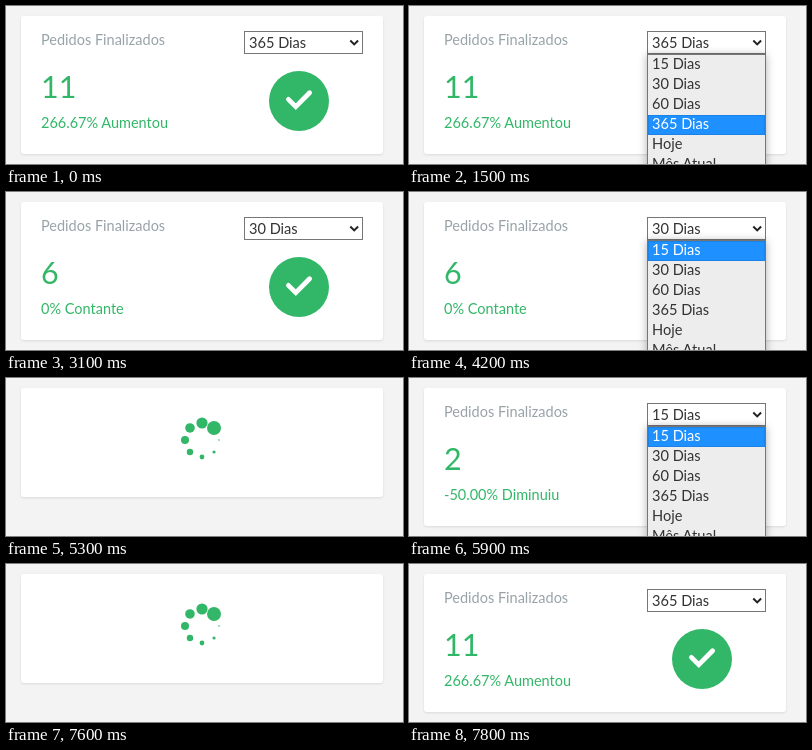
Write an HTML page that moves like this. It is 397 px wide and 158 px high and loops after 8 s.

```html
<!DOCTYPE html>
<html lang="pt">
<head>
<meta charset="utf-8">
<title>Pedidos Finalizados</title>
<style>
  html, body { margin: 0; width: 100%; height: 100%; overflow: hidden; background: #f3f3f3; }
  svg { display: block; width: 397px; height: 158px; font: 14.5px Lato, "Open Sans", sans-serif; }
  .title { fill: #98a3a8; }
  .green { fill: #32b768; }
  .count { font-size: 30.5px; }
  .field { font-size: 14.6px; fill: #333; }
  #card { filter: drop-shadow(0 1px 1px rgba(0, 0, 0, .1)); }
  #panel { filter: drop-shadow(0 1px 4px rgba(0, 0, 0, .32)); }
</style>
</head>
<body>
<svg viewBox="0 0 397 158">
  <rect width="397" height="158" fill="#f3f3f3"/>
  <rect id="card" x="15" y="10" width="362" height="138" rx="3" fill="#fff"/>
  <g id="content">
    <text class="title" x="35" y="39">Pedidos Finalizados</text>
    <text class="green count" id="count" x="35" y="91.5"></text>
    <text class="green" id="trend" x="35" y="122"></text>
    <circle class="green" cx="293" cy="95" r="30"/>
    <path d="M282.4 93.4L289.8 100.6L303.6 86.8" fill="none" stroke="#fff" stroke-width="4.8" stroke-linecap="round"/>
    <rect id="box" x="238.5" y="25.5" width="118" height="22" fill="#fff"/>
    <text class="field" id="value" x="243" y="42"></text>
    <path d="M344.3 34.5L348.2 38.4L352.1 34.5" fill="none" stroke="#222" stroke-width="2"/>
  </g>
  <g id="menu">
    <rect id="panel" x="238.5" y="48.5" width="118" height="130" fill="#ededed" stroke="#767676"/>
    <rect id="mark" x="239.5" width="116" height="19" fill="#1e90ff" stroke="#1c82e6"/>
  </g>
  <g id="loader"></g>
</svg>
<script>
const LOOP = 8000, DOTS = 8;
const options = ["15 Dias", "30 Dias", "60 Dias", "365 Dias", "Hoje", "Mês Atual"];
const results = {
  0: ["2", "-50.00% Diminuiu"],
  1: ["6", "0% Contante"],
  3: ["11", "266.67% Aumentou"]
};

// Each entry: start time, chosen option, view, highlighted option
const timeline = [
  [0, 3, "idle"],
  [1000, 3, "hover"],
  [1500, 3, "open", 3],
  [1700, 3, "open", 2],
  [1800, 3, "open", 0],
  [2000, 3, "open", 1],
  [2700, 3, "idle"],
  [2800, 1, "loading"],
  [3100, 1, "idle"],
  [3900, 1, "open", 1],
  [4200, 1, "open", 0],
  [5300, 0, "loading"],
  [5500, 0, "idle"],
  [5900, 0, "open", 0],
  [6200, 0, "open", 1],
  [6300, 0, "open", 2],
  [6400, 0, "open", 3],
  [7600, 3, "loading"],
  [7800, 3, "idle"]
];

const el = id => document.getElementById(id);
const add = (parent, tag, attrs) => {
  const node = document.createElementNS("http://www.w3.org/2000/svg", tag);
  for (const key in attrs) node.setAttribute(key, attrs[key]);
  return parent.appendChild(node);
};
const show = (node, on) => node.setAttribute("display", on ? "inline" : "none");

const labels = options.map((name, i) => {
  const label = add(el("menu"), "text", { class: "field", x: 243, y: 63 + 20 * i });
  label.textContent = name;
  return label;
});

const dots = Array.from({ length: DOTS }, (_, i) => {
  const angle = (i - 2) * Math.PI / 4;
  return add(el("loader"), "circle", {
    class: "green",
    cx: 196 + 17 * Math.cos(angle),
    cy: 62 + 17 * Math.sin(angle)
  });
});

function spin(elapsed) {
  const head = 1 + Math.floor(elapsed / 100);
  dots.forEach((dot, i) => {
    const lag = (head - i + DOTS) % DOTS;
    dot.setAttribute("r", lag ? 6.4 - 0.8 * lag : 7);
  });
}

function draw(time) {
  const [start, chosen, view, marked] = timeline.findLast(step => step[0] <= time);
  const loading = view === "loading", open = view === "open";
  show(el("content"), !loading);
  show(el("loader"), loading);
  show(el("menu"), open);
  el("card").setAttribute("height", loading ? 109 : 138);
  if (loading) return spin(time - start);

  [el("count").textContent, el("trend").textContent] = results[chosen];
  el("value").textContent = options[chosen];
  el("box").setAttribute("stroke", view === "hover" ? "#555" : "#767676");
  if (open) {
    el("mark").setAttribute("y", 49.5 + 20 * marked);
    labels.forEach((label, i) => { label.style.fill = i === marked ? "#fff" : "#333"; });
  }
}

const origin = performance.now();
function tick() {
  draw((performance.now() - origin) % LOOP);
  requestAnimationFrame(tick);
}
tick();
</script>
</body>
</html>
```
